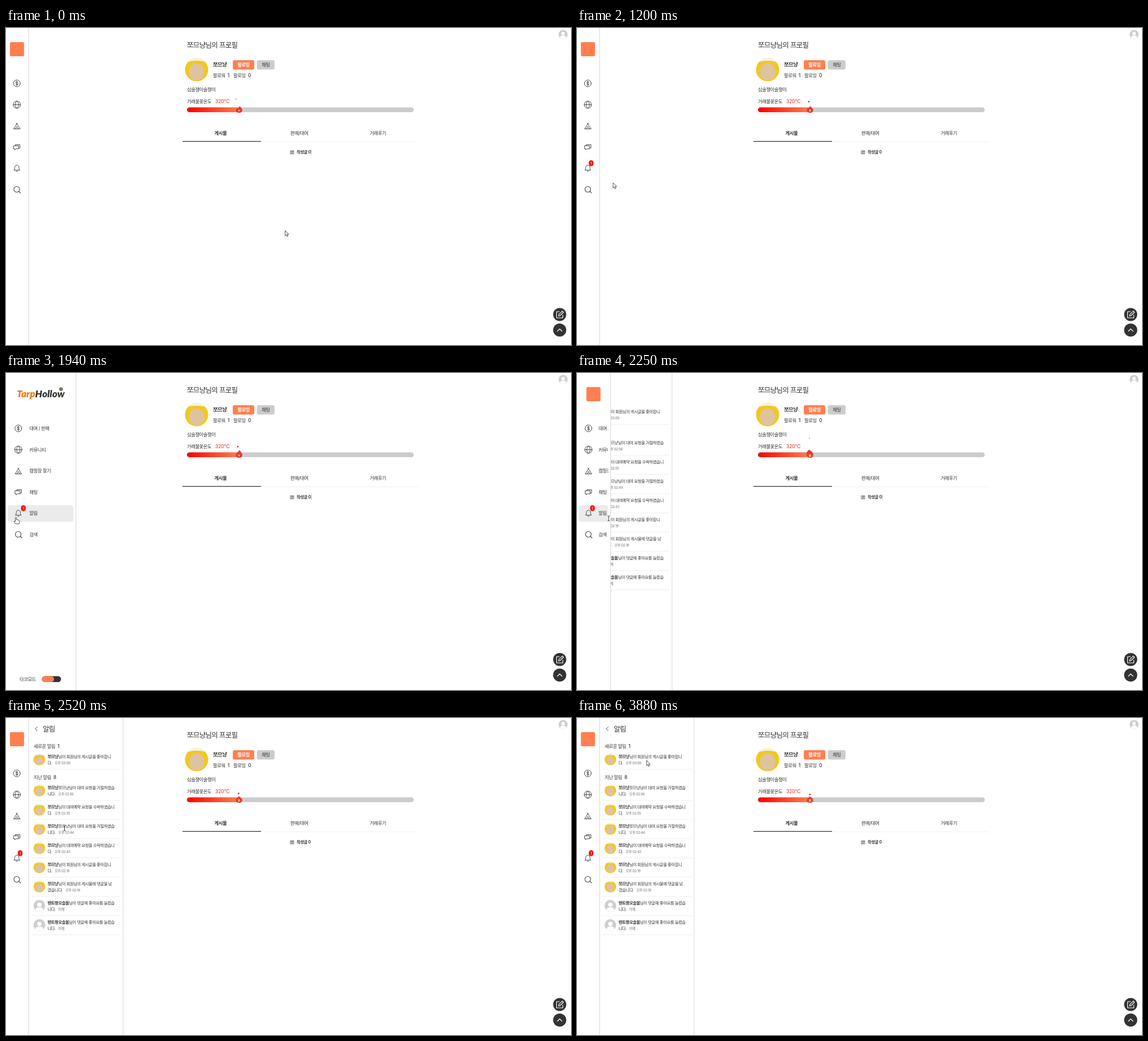
Animation of 999 by 561 pixels, one loop 3980 ms. Source, as an HTML page:

```html
<!DOCTYPE html>
<html lang="ko">
<head>
<meta charset="utf-8">
<title>프로필</title>
<style>
  html, body { margin: 0; width: 100%; height: 100%; overflow: hidden; background: #fff; }
  #stage { display: block; width: 100vw; height: 100vh; }
  text { font-family: Inter, "Noto Sans CJK KR", "Noto Sans CJK", sans-serif; letter-spacing: -.055em; fill: #333; }
  .line { fill: none; stroke: #444; stroke-width: 1; stroke-linecap: round; stroke-linejoin: round; }
  .mark { font-family: Lato, sans-serif; font-weight: 900; font-style: italic; letter-spacing: 0; }
</style>
</head>
<body>
<svg id="stage" viewBox="0 0 999 561" xmlns="http://www.w3.org/2000/svg"></svg>
<script>
const LOOP = 3980;
const OPEN = 1320, CLICK = 2111, SLIDE = 300;
const USER = '쪼므냥', OTHER = '텐트짱오솔봄';
const SMALL = 7.29, BODY = 8.33, LARGE = 12.5;

// Text placed by the vertical centre of its glyphs
const text = (x, y, size, str, attrs = '') =>
  `<text x="${x}" y="${y + size * .37}" font-size="${size}" ${attrs}>${str}</text>`;
const rect = (x, y, w, h, fill, rx = 0, attrs = '') =>
  `<rect x="${x}" y="${y}" width="${w}" height="${h}" rx="${rx}" fill="${fill}" ${attrs}/>`;
const circle = (x, y, r, fill, attrs = '') =>
  `<circle cx="${x}" cy="${y}" r="${r}" fill="${fill}" ${attrs}/>`;
const line = (d, attrs = '') => `<path class="line" d="${d}" ${attrs}/>`;
const at = (x, y, body, scale = 1) => `<g transform="translate(${x} ${y}) scale(${scale})">${body}</g>`;
const MID = 'text-anchor="middle"';

const portrait = (x, y, r) => at(x, y,
  circle(0, 0, 20.5, '#f0c91f') +
  '<path d="M-15 -14A20.5 20.5 0 0 1 15 -14Q0 -18 -15 -14Z" fill="#f4f2ec"/>' +
  '<ellipse cx="0" cy="4" rx="13.5" ry="15" fill="#dfc3a0"/>', r / 20.5);

const blankUser = (x, y, r) => at(x, y,
  circle(0, 0, 10, '#cfcdcd') + circle(0, -2, 3.8, '#fff') +
  '<path d="M-6.8 7.3C-6 2.5 -2.5 2.6 0 2.6S6 2.5 6.8 7.3A10 10 0 0 1 -6.8 7.3Z" fill="#fff"/>', r / 10);

function profile() {
  return text(320, 30.5, LARGE, `<tspan font-weight="500">${USER}</tspan>님의 프로필`) +
    portrait(337, 73.7, 20.5) +
    text(366, 65, 9.37, USER, 'font-weight="600"') +
    rect(401, 57, 38, 16.5, '#ff7f50', 3) +
    text(420, 65.2, BODY, '팔로잉', `${MID} font-weight="600" style="fill:#fff"`) +
    rect(443.5, 57, 31.3, 16.5, '#ccc', 3) +
    text(459.2, 65.2, BODY, '채팅', MID) +
    text(366, 84, BODY, '팔로워') + text(391.7, 84, BODY, '1', 'font-weight="500"') +
    text(402, 84, BODY, '팔로잉') + text(428, 84, BODY, '0', 'font-weight="500"') +
    text(320, 109, BODY, '심술쟁이술쟁이') +
    text(320, 129.8, BODY, '거래불꽃온도') +
    text(370, 129.8, BODY, '320°C', 'style="fill:#e8200c;letter-spacing:0"') +
    rect(320, 140.4, 401, 8.6, '#ccc', 4.3) +
    rect(320, 140.4, 92.3, 8.6, 'url(#heat)', 4.3) +
    text(379.3, 186, BODY, '게시물', `${MID} font-weight="700"`) +
    text(518.5, 186, BODY, '판매/대여', MID) +
    text(657.5, 186, BODY, '거래후기', MID) +
    rect(312, 201, 417, .8, '#eee') + rect(312, 200, 139, 1.2, '#333') +
    line('M503.2 217.2h5.6v5.6h-5.6zM504.6 218.7h2.8M504.6 220h2.8M504.6 221.3h1.8', 'style="stroke-width:.8"') +
    text(514, 219.8, SMALL, '작성글 0', 'font-weight="600"') +
    rect(539.3, 215, .8, 9, '#8a93a0', 0, 'id="caret"');
}

function corner() {
  return blankUser(985, 11.5, 8) +
    circle(979, 507, 11.6, '#333') + circle(979, 534.5, 11.6, '#333') +
    line('M978.5 502h-5v11h11v-5M977 509.6l.6-2.7 6-6 2.1 2.1-6 6z', 'style="stroke:#fff;stroke-width:1.1"') +
    line('M975 536.5l4-4 4 4', 'style="stroke:#fff;stroke-width:1.2"');
}

const likedPost = ['님이 회원님의 게시글을 좋아합니', '다.'];
const refused = [USER + '님이 대여 요청을 거절하였습', '니다.'];
const accepted = ['님이 대여예약 요청을 수락하였습니', '다.'];
const commented = ['님이 회원님의 게시물에 댓글을 남', '겼습니다.'];
const likedReply = ['님이 댓글에 좋아요를 눌렀습', '니다.'];

function notice(y, [first, second], when, name = USER) {
  return (name === USER ? portrait : blankUser)(59, y, 10.3) +
    text(73.5, y - 4.9, SMALL, `<tspan font-weight="600">${name}</tspan>${first}`) +
    text(73.5, y + 5.6, SMALL, `${second}<tspan dx="4.5" font-size="6.25" style="fill:#777">${when}</tspan>`) +
    rect(45, y + 17, 158, .7, '#e9e9e9');
}

function panel() {
  const past = [
    [refused, '오후 02:56'], [accepted, '오후 02:55'], [refused, '오후 02:44'], [accepted, '오후 02:43'],
    [likedPost, '오후 02:19'], [commented, '오후 02:18'], [likedReply, '어제', OTHER], [likedReply, '어제', OTHER]
  ];
  return rect(40, 0, 167, 561, '#fff') + rect(206.5, 0, 1, 561, '#d6d6d6') +
    line('M55.2 15.8l-3.4 3.5 3.4 3.5') +
    text(65, 19.3, LARGE, '알림', 'font-weight="500"') +
    text(49, 50.3, BODY, '새로운 알림') + text(91, 50.3, BODY, '1', 'font-weight="500"') +
    notice(73.5, likedPost, '오후 03:09') +
    text(49, 105.3, BODY, '지난 알림') + text(83.7, 105.3, BODY, '8', 'font-weight="500"') +
    past.map(([words, when, name], i) => notice(128.4 + 34 * i, words, when, name)).join('');
}

function sidebar() {
  const icons =
    line('M6 98a6 6 0 1 1-12 0a6 6 0 1 1 12 0M2 96.2c-.4-1.6-4-1.6-4 .2c0 2 4 1.2 4 3.3c0 1.8-3.7 1.8-4.1 0M0 94.2v7.6') +
    line('M6.4 135.7a6.4 6.4 0 1 1-12.8 0a6.4 6.4 0 1 1 12.8 0M-6.4 135.7h12.8M0 129.3c-4 3.5-4 9.3 0 12.8c4-3.5 4-9.3 0-12.8') +
    line('M-1 168.2L5.8 178.6H-5.8L1 168.2M-2.8 178.6L0 174.3l2.8 4.3') +
    line('M-2.8 208.2v-1.7h8.3v6h-1.9M-5.5 208.4h8.5v5.4h-4.8l-2 2v-2h-1.7z') +
    line('M-5 251.3c1.6-1.6 1.3-3 1.4-5c.2-4.6 7-4.6 7.2 0c.1 2-.2 3.4 1.4 5zM-1.3 253.4q1.3 1 2.6 0') +
    line('M4.8 285.5a5 5 0 1 1-10 0a5 5 0 1 1 10 0M3.6 289.2l2.8 2.8', 'style="stroke-width:1.1"');
  const labels = ['대여 / 판매', '커뮤니티', '캠핑장 찾기', '채팅', '알림', '검색']
    .map((label, i) => text(0, 98 + 37.6 * i, BODY, label)).join('');
  return rect(0, 0, '100%', 561, '#fff') +
    rect(3, 234, 0, 29.3, '#ebebeb', 4, 'id="hover"') +
    `<g id="icons">${icons}</g>` +
    `<svg id="labelClip" height="561"><g id="labels">${labels}</g></svg>` +
    `<g id="badge">${rect(-4.2, 234, 8.4, 10.4, '#f5150e', 4.2)}${text(0, 239.3, 6.3, '1', `${MID} style="fill:#fff;letter-spacing:0"`)}</g>` +
    `<g id="square">${rect(-12.5, 25, 25, 25, '#ff7f50', 2.5)}</g>` +
    `<g id="wordmark"><text class="mark" x="0" y="42.5" font-size="17.3" ${MID}><tspan fill="#f37a16">Tarp</tspan>Hollow</text>${circle(36, 28.6, 3.4, '#6d8060')}</g>` +
    `<g id="mode">${text(24, 541.6, BODY, '다크모드')}${rect(63.5, 536.5, 33.8, 10.5, '#333', 5.2)}${rect(63.5, 536.5, 21.5, 10.5, '#ff7f50', 5.2)}</g>`;
}

const cursors = {
  arrow: '<path d="M0 0V9.2L2.1 7.4L3.6 10.6L5.1 9.9L3.7 6.8H6.4Z" fill="#fff" stroke="#222" stroke-width=".8"/>',
  hand: '<path d="M-1.1 .8Q0 -.7 1.1 .8V4.4Q3 3.8 3.2 5Q5 4.6 5 5.6Q6.4 5.6 6.2 7L5.4 11.8H-.6L-3.6 7.6Q-3.4 6 -1.1 7.6Z" fill="#fff" stroke="#222" stroke-width=".8"/>',
  beam: line('M-1.5 -4.5Q0 -4.5 0 -3.5Q0 -4.5 1.5 -4.5M0 -3.5V3.5M-1.5 4.5Q0 4.5 0 3.5Q0 4.5 1.5 4.5', 'style="stroke:#222;stroke-width:.9"')
};

const stage = document.getElementById('stage');
stage.innerHTML =
  `<defs><linearGradient id="heat"><stop stop-color="#f00"/><stop offset="1" stop-color="#ff7f50"/></linearGradient></defs>` +
  rect(0, 0, 999, 561, '#fff') + profile() +
  '<path id="flame" fill="#e33a3a"/><ellipse id="core" fill="#ffd27a"/><circle id="spark0"/><circle id="spark1"/>' +
  corner() + `<g id="panel">${panel()}</g>` +
  `<svg id="side" height="561">${sidebar()}</svg>` + rect(0, 0, 1, 561, '#d6d6d6', 0, 'id="edge"') +
  `<g id="cursor">${Object.keys(cursors).map(k => `<g id="${k}">${cursors[k]}</g>`).join('')}</g>`;

const el = id => document.getElementById(id);
const set = (id, attrs) => { for (const k in attrs) el(id).setAttribute(k, attrs[k]); };
const show = (id, on) => set(id, { visibility: on ? 'visible' : 'hidden' });
const shift = (id, x, y = 0) => set(id, { transform: `translate(${x} ${y})` });
const ramp = (t, a, b) => Math.min(1, Math.max(0, (t - a) / (b - a)));

// The standard CSS "ease" curve
function ease(x) {
  let lo = 0, hi = 1;
  for (let i = 0; i < 20; i++) {
    const u = (lo + hi) / 2, v = 1 - u;
    if (.75 * v * v * u + .75 * v * u * u + u ** 3 < x) lo = u; else hi = u;
  }
  const v = 1 - lo;
  return .3 * v * v * lo + 3 * v * lo * lo + lo ** 3;
}

// Linear interpolation through rows of [time, ...values]
function track(rows, t) {
  const i = rows.findIndex(r => r[0] > t);
  if (i < 0) return rows[rows.length - 1].slice(1);
  const a = rows[i - 1], b = rows[i], k = ramp(t, a[0], b[0]);
  return a.slice(1).map((v, j) => v + (b[j + 1] - v) * k);
}

const pointer = [
  [0, 493.5, 358.5], [850, 493.5, 358.5], [1200, 64, 274], [1400, 22.8, 256.3], [1940, 17.6, 255.2],
  [2110, 17.6, 255.2], [2340, 80.3, 258.5], [2650, 120, 150], [2880, 142, 86], [2990, 141, 84.3],
  [3380, 131, 76.5], [3510, 131, 76.5], [3680, 123, 75]
];

// phase, tip x, tip y, shoulder fullness, core size
const flamePoses = [
  [0, 413.3, 138.2, .2, 1.6], [150, 410.5, 134, .1, 1.8], [330, 411.5, 137, .4, 2], [520, 412.8, 136, .15, 1.7],
  [780, 409, 135.8, 1, 2.5], [920, 412.5, 135.8, .9, 2.6], [1040, 411.5, 138, .15, 2.3], [1420, 413.3, 138.2, .2, 1.6]
];
// age, height, radius
const sparkRise = [
  [0, 135.3, 1.5], [160, 130.5, 1.4], [380, 126, .9], [420, 119, .8], [530, 111, .8], [560, 106, .8], [600, 105, 0]
];
const sparks = [{ born: 1040, drift: 3.5 }, { born: 360, drift: 11 }];

function drawFlame(t) {
  const phase = t % 1420;
  const [x, y, full, core] = track(flamePoses, phase);
  const neck = .8 + 4.4 * full;
  set('flame', { d: `M${x} ${y}C${x + neck} ${y + 3} 417.8 141.5 417.8 145.2C417.8 151.8 406.2 151.8 406.2 145.2C406.2 141.5 ${x - neck} ${y + 4} ${x} ${y}Z` });
  set('core', { cx: 412, cy: 146, rx: core * .8, ry: core });
  sparks.forEach(({ born, drift }, i) => {
    const age = (phase - born + 1420) % 1420;
    const [cy, r] = track(sparkRise, age);
    const cx = 412 - 5.3 * ramp(age, 0, 400) + drift * ramp(age, 420, 550);
    set('spark' + i, { cx, cy, r, fill: age > 540 ? '#f2a52c' : '#dd3333' });
  });
}

function drawSidebar(t) {
  const slid = ease(ramp(t, CLICK, CLICK + SLIDE));
  const open = ease(ramp(t, OPEN, OPEN + SLIDE)) - slid;
  const drift = 1 - (1 - open) ** 2;
  const width = 40 + 83.6 * open;
  const expanded = t >= OPEN && t < CLICK;
  set('side', { width });
  set('edge', { x: width - .5 });
  set('labelClip', { width: width - 4.5 });
  set('hover', { width: width - 7.5, opacity: ramp(t, 1340, 1460) * (1 - ramp(t, 2280, 2440)) });
  shift('icons', 19.2 + 2.6 * drift);
  shift('labels', 35.7 + 5.6 * drift);
  shift('badge', 25 + 5.7 * drift);
  shift('square', width / 2 - .6);
  shift('wordmark', width / 2 - .5);
  shift('mode', -175 * (1 - open));
  show('badge', t >= 390);
  show('square', !expanded);
  show('wordmark', expanded);
  shift('panel', -167 * (1 - slid));
  show('panel', t >= CLICK);
}

function drawCursor(t) {
  const kind = t >= OPEN && t < 2170 ? 'hand' : t >= 2170 && t < 2600 ? 'beam' : 'arrow';
  for (const k in cursors) show(k, k === kind);
  shift('cursor', ...track(pointer, t));
}

function draw(t) {
  drawFlame(t);
  drawSidebar(t);
  drawCursor(t);
  show('caret', t < 2260 && (t + 390) % 1060 < 530);
}

const start = performance.now();
function tick() {
  draw((performance.now() - start) % LOOP);
  requestAnimationFrame(tick);
}
tick();
</script>
</body>
</html>
```
